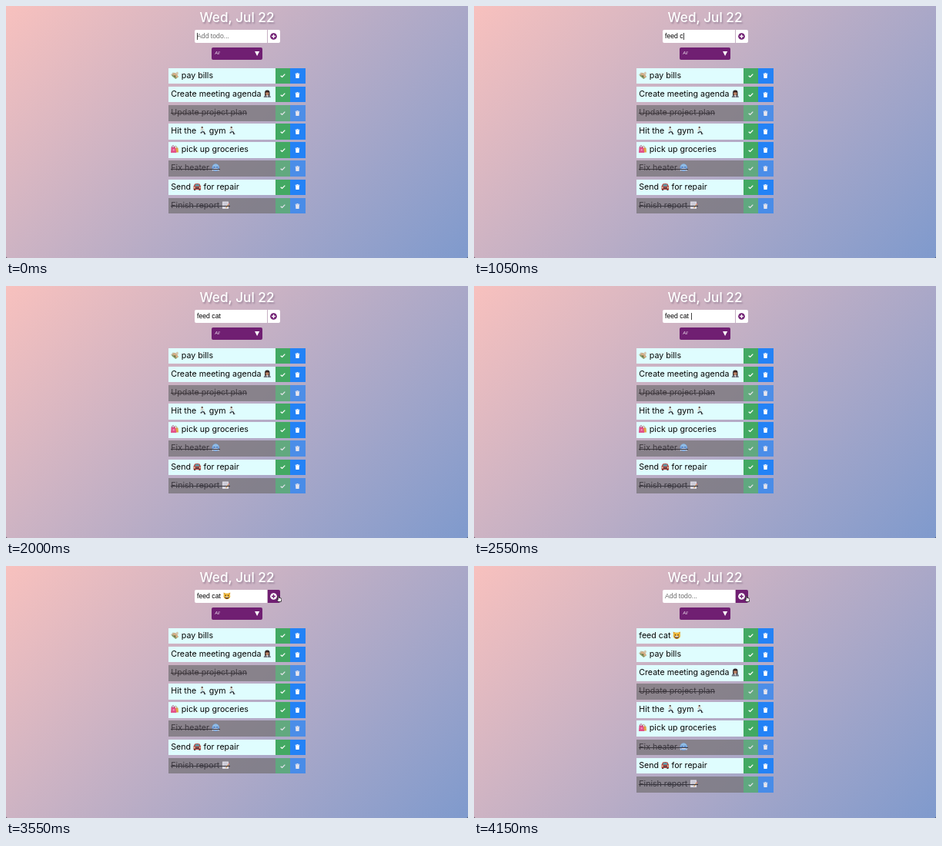
These frames come from a looping animation (600 by 328 pixels, 4.2 s). An HTML page:

```html
<!DOCTYPE html>
<html lang="en">
<head>
<meta charset="utf-8">
<title>Todo list</title>
<style>
  html, body { margin: 0; width: 100%; height: 100%; overflow: hidden; background: #3a3a44; }
  #stage {
    position: relative; width: 600px; height: 328px; overflow: hidden;
    border-radius: 0 0 2px 2px;
    background: linear-gradient(135deg, #f8c1be, #7f9acd);
    font-family: Inter, "Open Sans", sans-serif;
  }
  #stage > * { position: absolute; box-sizing: border-box; }
  h1 {
    left: 0; top: 4px; width: 600px; margin: 0; text-align: center;
    font-size: 17.2px; line-height: 22px; font-weight: 500; color: #fff;
    text-shadow: 1.5px 1.5px 2px rgba(95, 75, 105, .38);
  }
  #field {
    left: 244.5px; top: 31px; width: 94.5px; height: 16.5px; padding-left: 3.5px;
    background: #fff; border-radius: 2px 0 0 2px; white-space: pre;
    font: 8.7px/16.5px "Liberation Sans", Arial, sans-serif; color: #000;
  }
  #field.empty { color: #6c6c6c; }
  #caret { top: 34.5px; width: .8px; height: 9.5px; background: #444; }
  #add { left: 340px; top: 31px; width: 15.8px; height: 16.5px; border-radius: 0 2px 2px 0; background: #fff; color: #701f72; }
  #add.hover { background: #701f72; color: #fff; }
  #add svg { position: absolute; left: 3.2px; top: 3.5px; width: 9px; height: 9px; }
  #add path { stroke: #fff; }
  #add.hover path { stroke: #701f72; }
  #filter { left: 267px; top: 54.4px; width: 66.2px; height: 15.8px; border-radius: 2px; background: #701f72; color: #fff; }
  #filter span { position: absolute; left: 4.2px; top: 0; font-size: 5.4px; line-height: 15.8px; font-style: italic; opacity: .85; }
  #filter svg { position: absolute; left: 55.9px; top: 4.4px; width: 6.2px; height: 6px; }
  #list { left: 211px; top: 80.6px; }
  .row { display: flex; width: 177.8px; height: 20.7px; margin-bottom: 3.48px; }
  .label {
    width: 138.5px; padding-left: 3.3px; box-sizing: border-box; white-space: pre;
    background: #dffdfe; color: #050505; font-size: 10.62px; line-height: 20.7px;
  }
  .label span { position: relative; display: inline-block; }
  .btn { width: 19.7px; display: flex; align-items: center; justify-content: center; background: #42a962; }
  .btn + .btn { width: 19.6px; background: #2382f6; }
  .btn svg { width: 7px; height: 7px; }
  .done { opacity: .7; }
  .done .label { background: #737073; }
  .done .label span::after {
    content: ""; position: absolute; left: 0; right: 0; top: 10.4px; height: .8px; background: #050505;
  }
  .emoji { width: 10.6px; height: 10.6px; vertical-align: -1.7px; }
  #field .emoji { width: 9.8px; height: 9.8px; margin-left: .6px; vertical-align: -1.8px; }
  #hand { width: 7.3px; height: 9px; }
</style>
</head>
<body>
<div id="stage">
  <h1>Wed, Jul 22</h1>
  <div id="field"></div>
  <div id="caret"></div>
  <div id="add">
    <svg viewBox="0 0 20 20"><circle cx="10" cy="10" r="9.6" fill="currentColor"/><path d="M10 4.5v11M4.5 10h11" stroke-width="3"/></svg>
  </div>
  <div id="filter">
    <span>All</span>
    <svg viewBox="0 0 10 10"><path d="M0 0h10L5 10z" fill="#fff"/></svg>
  </div>
  <div id="list"></div>
  <svg id="hand" viewBox="0 0 13 16"><path d="M4 9V2.2q1.2-1.6 2.4 0V6l4.4 1q1.6.6 1.4 2.4l-1 5.6H5L1 10.4q0-2 3 .2z" fill="#fff" stroke="#111" stroke-width="1.4"/></svg>
</div>
<script>
const $ = id => document.getElementById(id);
const path = (d, fill) => `<path d="${d}" fill="${fill}"/>`;
const disc = (x, y, r, fill) => `<circle cx="${x}" cy="${y}" r="${r}" fill="${fill}"/>`;
const line = (d, color, w) =>
  `<path d="${d}" fill="none" stroke="${color}" stroke-width="${w}" stroke-linecap="round" stroke-linejoin="round"/>`;

const art = {
  cash: path("M0 9 5 3l5 1 2 5-6 3z", "#c9bda6") + path("M9 6l7-5 3 3-2 6-4 2z", "#d3c6ae") +
    path("M2 11 9 4l10 9-7 6z", "#8a9c68") + path("M5 8l4-4 10 9-4 3z", "#dcae86") + disc(10, 12, 2.2, "#5f6f42"),
  worker: path("M4 17V7q0-6 6-6t6 6v10z", "#2b2022") + path("M1 20q0-6 6-7h6q6 1 6 7z", "#6d747f") +
    path("M8 13h4l-2 6z", "#f1f1f1") + `<ellipse cx="10" cy="8.5" rx="4.2" ry="5.2" fill="#b98266"/>` +
    path("M5.5 8q1-5 5-5t4 4q-6-2-9 1z", "#2b2022"),
  runner: line("M10 12l4 2 1 4M9 12l-2 3", "#262a30", 2.6) + line("M9 6v5", "#b9d3da", 3.4) +
    line("M7 6 5 9M11 7l3 2", "#e5bda0", 1.6) + disc(8.5, 3, 2.2, "#e5bda0") +
    path("M6.4 2.4q1-2.4 3-2.2t1.8 3z", "#33272a") + line("M15 18h2M7 15l-2 0", "#40464f", 1.8),
  bags: path("M6 7h12l1 11H8z", "#e3a548") + line("M9 8V5q3-5 6 0v3", "#a76a2c", 1.4) +
    path("M1 5h10l3 14H0z", "#e2518b") + line("M3 6V3q3-4 5 0v3", "#9e3262", 1.4) + disc(7, 12, 2, "#f6a4c4"),
  cold: disc(10, 10, 9, "#4f9be8") + path("M2 8q2-7 8-7t8 7z", "#7ec3f4") +
    disc(6.5, 9, 1.3, "#243f70") + disc(13.5, 9, 1.3, "#243f70") +
    path("M5 12h10v4H5z", "#f4f8fb") + path("M0 13l5 2-2 4z", "#b9e2fb") + path("M20 13l-5 2 2 4z", "#b9e2fb"),
  car: path("M2 16h4v3H2zM14 16h4v3h-4z", "#333") + path("M1 9l3-6q6-2 12 0l3 6v8H1z", "#b9443f") +
    path("M4 9l2-5h8l2 5z", "#5f9aa8") + path("M5 12h10v3H5z", "#4e4a50") +
    disc(3.5, 12, 1.6, "#f6e6ad") + disc(16.5, 12, 1.6, "#f6e6ad"),
  memo: path("M2 1h15v18H2z", "#f2f2f4") + line("M5 5h9M5 8h9M5 11h6M5 14h4", "#9ca0ab", 1) +
    line("M18 7 11 16", "#d99a3c", 2.6) + line("M18.4 6.5l-.6.8", "#d65d70", 2.6),
  cat: path("M1 1l7 3-6 6zM19 1l-7 3 6 6z", "#e0a02a") + `<ellipse cx="10" cy="11" rx="9" ry="8" fill="#f2bb3b"/>` +
    disc(6.5, 9, 1.6, "#4b351c") + disc(13.5, 9, 1.6, "#4b351c") +
    path("M4 12h12q-1 6-6 6t-6-6z", "#67401f") + path("M5.5 12h9l-1 2h-7z", "#fff"),
};
const rich = s => s.replace(/\{(\w+)\}/g, (_, k) => `<svg class="emoji" viewBox="0 0 20 20">${art[k]}</svg>`);

const icon = body => `<div class="btn"><svg viewBox="0 0 20 20">${body}</svg></div>`;
const check = icon(`<path d="M2 10.5l5.5 5L18 4.5" fill="none" stroke="#fff" stroke-width="3.6"/>`);
const trash = icon(path("M2 2h5l1-2h4l1 2h5v3H2zM3 6h14l-1 14H4z", "#fff"));

// A leading "-" marks a finished task.
const tasks = [
  "feed cat {cat}", "{cash} pay bills", "Create meeting agenda {worker}", "-Update project plan",
  "Hit the {runner} gym {runner}", "{bags} pick up groceries", "-Fix heater {cold}",
  "Send {car} for repair", "-Finish report {memo}",
];
$("list").innerHTML = tasks.map(s => {
  const done = s[0] === "-";
  return `<div class="row${done ? " done" : ""}"><div class="label"><span>${rich(done ? s.slice(1) : s)}</span></div>${check}${trash}</div>`;
}).join("");
const newRow = $("list").firstElementChild;

const LOOP = 4200, HOVER = 3400, ADDED = 3950, BLINK = 500;
// [time, field text, caret x]
const typing = [
  [0, "", 248], [250, "f", 250.5], [350, "fe", 255.3], [450, "fee", 260.1], [550, "feed", 265],
  [900, "feed ", 267.4], [1000, "feed c", 271.7], [1130, "feed ca", 276.6], [1250, "feed cat", 279.2],
  [2100, "feed cat ", 281.6], [2800, "feed cat {cat}", 291.2], [ADDED, "", 248],
];
let shown = null;

function draw(t) {
  const step = typing.filter(k => k[0] <= t).pop();
  const [at, text, x] = step;
  if (shown !== step) {
    $("field").innerHTML = text ? rich(text) : "Add todo...";
    $("field").className = text ? "" : "empty";
    $("caret").style.left = x + "px";
    shown = step;
  }
  const blinkOn = Math.floor((t - at) / BLINK) % 2 === 0;
  $("caret").style.visibility = t < ADDED && blinkOn ? "visible" : "hidden";
  $("add").className = t >= HOVER ? "hover" : "";
  newRow.style.display = t >= ADDED ? "" : "none";

  const glide = Math.min(1, Math.max(0, (t - HOVER + 100) / 150));
  const rest = (1 - glide) ** 2;
  $("hand").style.left = 350.6 + 8 * rest + "px";
  $("hand").style.top = 38 + 8 * rest + "px";
  $("hand").style.visibility = t >= HOVER - 100 ? "visible" : "hidden";
}

const start = performance.now();
function tick() {
  draw((performance.now() - start) % LOOP);
  requestAnimationFrame(tick);
}
tick();
</script>
</body>
</html>
```
